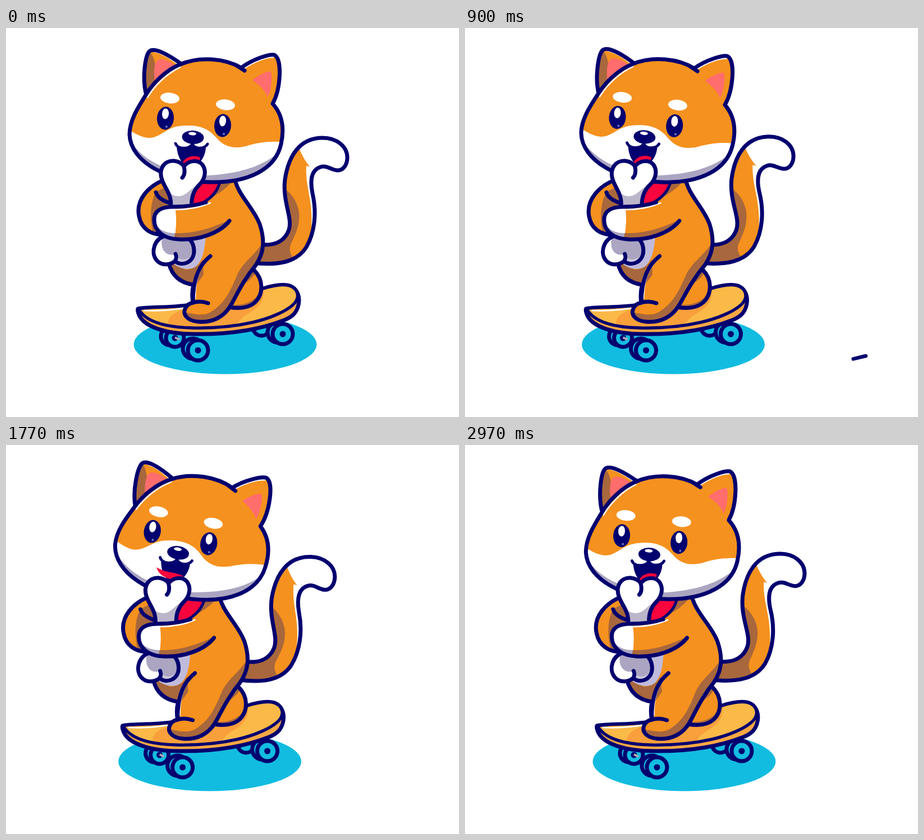
An HTML page that plays this animation: 807x694 px, repeating every 3 s.

```html
<!DOCTYPE html>
<html lang="en">
<head>
<meta charset="utf-8">
<title>Skateboarding dog</title>
<style>
html, body { margin: 0; width: 100%; height: 100%; overflow: hidden; background: #fff; }
svg { display: block; width: 100vw; height: 100vh; }
.line { fill: none; stroke: #03006f; stroke-width: 7; stroke-linecap: round; stroke-linejoin: round; }
.shine { fill: none; stroke: #fff; stroke-width: 2.5; stroke-linecap: round; }
</style>
</head>
<body>
<svg id="stage" viewBox="0 0 807 694"></svg>
<script>
const NAVY = '#03006f', ORANGE = '#f5911e', BROWN = '#a8673c', GREY = '#aba5c1',
      PINK = '#ff6d6c', RED = '#f7053c', CYAN = '#12bce0', DECK = '#fbb948';
const $ = id => document.getElementById(id);

const fill = (d, color) => `<path d="${d}" fill="${color}"/>`;
const line = (d, width = 7) => `<path class="line" style="stroke-width:${width}" d="${d}"/>`;
const shine = d => `<path class="shine" d="${d}"/>`;
const oval = (x, y, rx, ry, color, turn = 0) =>
  `<ellipse cx="${x}" cy="${y}" rx="${rx}" ry="${ry}" fill="${color}" transform="rotate(${turn} ${x} ${y})"/>`;
// Filled shape with shading kept inside its outline
const part = (id, d, color, inner = '', edge = line(d)) =>
  `<clipPath id="${id}"><path d="${d}"/></clipPath>${fill(d, color)}
   <g clip-path="url(#${id})">${inner}</g>${edge}`;
const disc = (x, y, r) => `<circle class="line" cx="${x}" cy="${y}" r="${r}" style="fill:${CYAN}"/>`;
const wheel = (x, y, r = 18) => disc(x - 9, y - 3, r) + disc(x, y, r) + oval(x, y, 5.5, 5.5, NAVY);

const shadow = oval(390.5, 564.5, 163, 53, CYAN);

const deckEdge = 'M236 501C250 497 290 500 328 494L458 465C480 458 502 455 513 464C523 473 521 485 511 494C498 506 470 518 440 525C405 533 370 536 330 535C290 534 250 527 236 501Z';
const board = wheel(301, 553, 16) + `<path d="M301 552L309 556" stroke="#b0a5b5" stroke-width="4"/>` +
  wheel(342, 575) + disc(455, 534, 15) + wheel(493, 546) +
  part('rim', 'M235 501C250 497 290 500 328 494L458 465C480 458 502 455 513 464C522 472 524 486 520 498C516 510 508 516 496 521C450 539 395 547 335 546C285 546 248 533 238 514C235 508 234 504 235 501Z', '#f8a744') +
  part('deck', deckEdge, DECK,
    fill('M292 540C283 520 292 508 325 500L458 466C462 490 447 500 428 512C415 520 410 530 411 540Z', '#f99f3b') +
    shine('M246 504C265 505 290 504 315 500'), line(deckEdge, 5.5));

const tail = part('tailClip', 'M440 384C475 392 496 382 504 360C511 338 492 310 497 270C503 230 522 196 564 196C590 196 608 212 608 231C608 245 600 254 591 254C580 254 572 244 560 248C545 253 541 270 546 295C554 330 550 365 535 391C518 418 485 424 440 419Z', ORANGE,
  fill('M490 282C512 295 525 320 522 342C521 358 515 368 511 378C504 390 504 398 510 408L490 428H430V370L490 375Z', BROWN) +
  fill('M520 210C528 228 535 244 549 254L620 270V185H540Z', '#fff') +
  fill('M535 246C533 285 547 305 544 355L560 340L555 250Z', '#fff'));

const backLeg = part('backLegClip', 'M425 435L442 432C458 448 460 474 443 490C430 502 408 501 385 496Z', ORANGE,
  fill('M380 490C410 498 435 495 452 474L455 510H380Z', BROWN) +
  fill('M448 428C444 442 432 452 420 460L410 440Z', BROWN));

const torso = part('torsoClip', 'M300 262H406C411 298 440 318 452 350C462 380 459 402 445 423C425 447 414 470 402 492C387 520 362 526 342 524C322 522 315 511 319 501C322 493 328 491 333 490C331 478 332 466 334 458C312 455 296 443 290 420L278 365Z', ORANGE,
  fill('M464 370C450 402 425 413 412 440C398 474 388 492 366 506C350 516 334 509 316 507V530H390L412 490L460 430Z', BROWN) +
  fill('M285 415L320 431C340 430 347 418 350 412L352 440L336 462H290Z', BROWN) +
  fill('M310 370H356C354 390 353 410 340 424C328 434 312 430 300 422Z', '#c0bbdc') +
  fill('M300 260H412C400 282 382 295 355 308L300 320Z', BROWN) +
  fill('M328 316L336 270H386C380 290 366 303 352 311Z', RED) +
  shine('M356 418C342 433 337 453 337 482')) +
  line('M380 278C375 295 363 305 350 312', 5) +
  line('M364 407C344 423 333 446 333 490C341 487 352 488 360 491');

const farArm = part('farArmClip', 'M290 268C252 280 231 308 237 336C241 358 258 368 277 369L300 320Z', ORANGE,
  fill('M292 280L268 292C256 310 255 345 264 372H310Z', BROWN)) +
  line('M267 293C270 303 281 309 294 313');

const ear = part('earClip', 'M250 120C242 90 248 50 255 42C263 33 290 48 312 64L290 110Z', ORANGE,
  fill('M255 40C266 55 270 72 264 100L250 130L235 60Z', BROWN) +
  fill('M265 96C262 72 265 59 273 56C283 55 295 62 305 68L285 90Z', PINK) +
  shine('M264 42C280 45 295 56 306 64'));

const mouth = fill('M304 211C305 228 312 241 322 247L345 240C352 232 356 222 356 211Z', NAVY) +
  `<path id="tongue" d="M313 243C318 230 334 225 346 231L343 245Z" fill="${RED}"/>
   <path id="lick" d="M297 224C312 233 333 229 346 236L338 244C319 244 302 239 297 224Z" fill="${RED}"/>` +
  fill('M304 206C308 215 326 216 332 207C337 217 353 215 358 206L345 195H315Z', '#fff') +
  line('M302 206C306 217 326 217 332 207C337 218 355 215 359 207', 5);

const eye = (x, y) => oval(x, y, 15, 20.5, NAVY, 4) + oval(x, y - 8, 6, 9.5, '#fff', 4) + oval(x + 2, y + 15, 2, 2, '#6b74c8');

const head = ear + part('headClip',
  'M250 118C262 98 285 75 310 65C345 50 390 54 419 71C440 55 470 46 478 48C493 56 489 110 475 135C493 155 496 180 490 207C480 253 430 276 366 275C290 275 222 240 220 190C220 165 235 142 250 118Z', ORANGE,
  fill('M215 179C232 190 248 199 263 195C283 189 288 175 320 174C346 173 361 180 374 195C388 212 405 216 427 211C450 204 470 201 500 204V290H215Z', '#fff') +
  fill('M215 188C236 240 300 262 360 263C430 259 474 240 500 206V290H215Z', GREY) +
  fill('M439 93C448 85 465 76 472 78C476 90 471 115 466 123C462 112 452 102 439 93Z', PINK) +
  shine('M252 124C264 104 285 82 310 70') + shine('M424 72C442 60 463 52 476 52')) +
  line('M411 67L425 76') +
  oval(292, 125, 17, 9.5, '#fff', 6) + oval(391, 137, 17, 9.5, '#fff', 6) +
  eye(284, 161) + eye(386, 174) + mouth +
  oval(333, 195, 19.5, 12, NAVY, 4) + oval(332, 188.5, 7, 3, '#fff', 4);

const bone = part('boneLow', 'M286 370C264 375 257 400 268 414C278 426 294 422 301 416C315 427 335 417 335 398C335 386 330 378 322 372Z', GREY,
    fill('M255 376H278C274 398 288 409 303 403L302 430H255Z', '#fff') +
    fill('M300 406C315 418 325 414 340 397L330 430H300Z', '#cbc6da')) +
  line('M301 416C304 411 304 408 302 403') +
  part('boneTop', 'M293 325C297 300 286 290 280 276C269 252 282 236 299 237C309 238 314 242 317 247C325 236 342 234 350 244C359 257 352 272 345 279C334 290 329 302 331 325Z', '#fff',
    fill('M280 286C298 303 312 304 325 292L345 275V330H285Z', '#bbb6ca')) +
  line('M317 247C319 256 318 263 314 267');

const armTop = 'C263 326 277 319 298 319C320 319 340 316 356 311';
const armLow = 'M398 344C380 367 342 379 307 377C280 376 264 361 264 343';
const nearArm = part('armClip', `${armLow}${armTop}L374 305Z`, ORANGE,
  fill('M255 310H299C304 330 305 350 299 384H255Z', '#fff') +
  fill('M300 366C330 367 362 360 400 341V387H298Z', BROWN) +
  fill('M264 349C275 361 285 366 301 366L298 384H260Z', GREY) +
  shine('M302 324C325 324 348 319 364 312'), line(armLow + armTop));

const streaks = [
  { from: [300, 517], to: [134, 556], starts: [170] },
  { from: [714, 585], to: [543, 627], starts: [840, 2240] },
  { from: [150, 470], to: [3, 506], starts: [1770] }
];

$('stage').innerHTML = `<g id="shadow">${shadow}</g>` +
  streaks.map((s, i) => `<path id="streak${i}" class="line" style="stroke-width:6.5"/>`).join('') +
  `<g id="board">${board}</g><g id="tail">${tail}</g>
   <g id="body">${backLeg + torso + farArm}</g><g id="head">${head}</g><g id="front">${bone + nearArm}</g>`;

const LOOP = 3000;
const TIMES = [0, 420, 900, 1260, 1500, 1770, 2220, 2970, 3000];
const LEAN = [0, 1.3, 3.4, 3.4, 2.2, 0, -3.5, -2.5, -2.4];
const NOD = [0, .5, 1.1, 1.7, 3.9, 5, -.6, -.5, -.5];
const SWAY = [0, -.35, -1.15, 0, 1.1, 1.8, 1.3, -1, -1];
const LICK = [0, 0, 0, 0, .3, 1, 0, 0, 0];

const smooth = p => (p = Math.min(1, Math.max(0, p)), p * p * (3 - 2 * p));

// Smooth curve through the keyed poses
function pose(keys, t) {
  let i = 0;
  while (i < TIMES.length - 2 && t >= TIMES[i + 1]) i++;
  const slope = k => {
    const a = Math.max(0, k - 1), b = Math.min(TIMES.length - 1, k + 1);
    return (keys[b] - keys[a]) / (TIMES[b] - TIMES[a]);
  };
  const span = TIMES[i + 1] - TIMES[i], p = (t - TIMES[i]) / span;
  return keys[i] + (keys[i + 1] - keys[i]) * smooth(p) +
    span * p * (1 - p) * (slope(i) * (1 - p) - slope(i + 1) * p);
}

function drawStreak(s, i, t) {
  const start = s.starts.findLast(a => t > a) ?? t;
  const at = p => s.from.map((v, k) => v + (s.to[k] - v) * p);
  const tip = smooth((t - start) / 270), end = smooth((t - start - 155) / 300);
  $('streak' + i).setAttribute('d', tip - end > .01 ? `M${at(end)}L${at(tip)}` : '');
}

function draw(now) {
  const t = now % LOOP;
  const move = (id, value) => $(id).setAttribute('transform', value);
  const x = -30 * smooth(1 - Math.abs(t / (LOOP / 2) - 1));
  const lean = pose(LEAN, t), k = lean / 170;
  const shear = `matrix(1 0 ${-k} 1 ${x + 510 * k} 0)`;
  move('shadow', `translate(${x})`);
  move('board', `translate(${x})`);
  move('tail', `translate(${x}) rotate(${pose(SWAY, t)} 455 400)`);
  move('body', shear);
  move('front', shear);
  move('head', `translate(${x + 305 * k}) rotate(${pose(NOD, t)} 364 205)`);
  const lick = smooth(pose(LICK, t));
  move('lick', `translate(335 238) scale(${lick}) translate(-335 -238)`);
  move('tongue', `translate(330 245) scale(1 ${1 - lick}) translate(-330 -245)`);
  streaks.forEach((s, i) => drawStreak(s, i, t));
  requestAnimationFrame(() => draw(performance.now() - origin));
}
const origin = performance.now();
draw(0);
</script>
</body>
</html>
```
